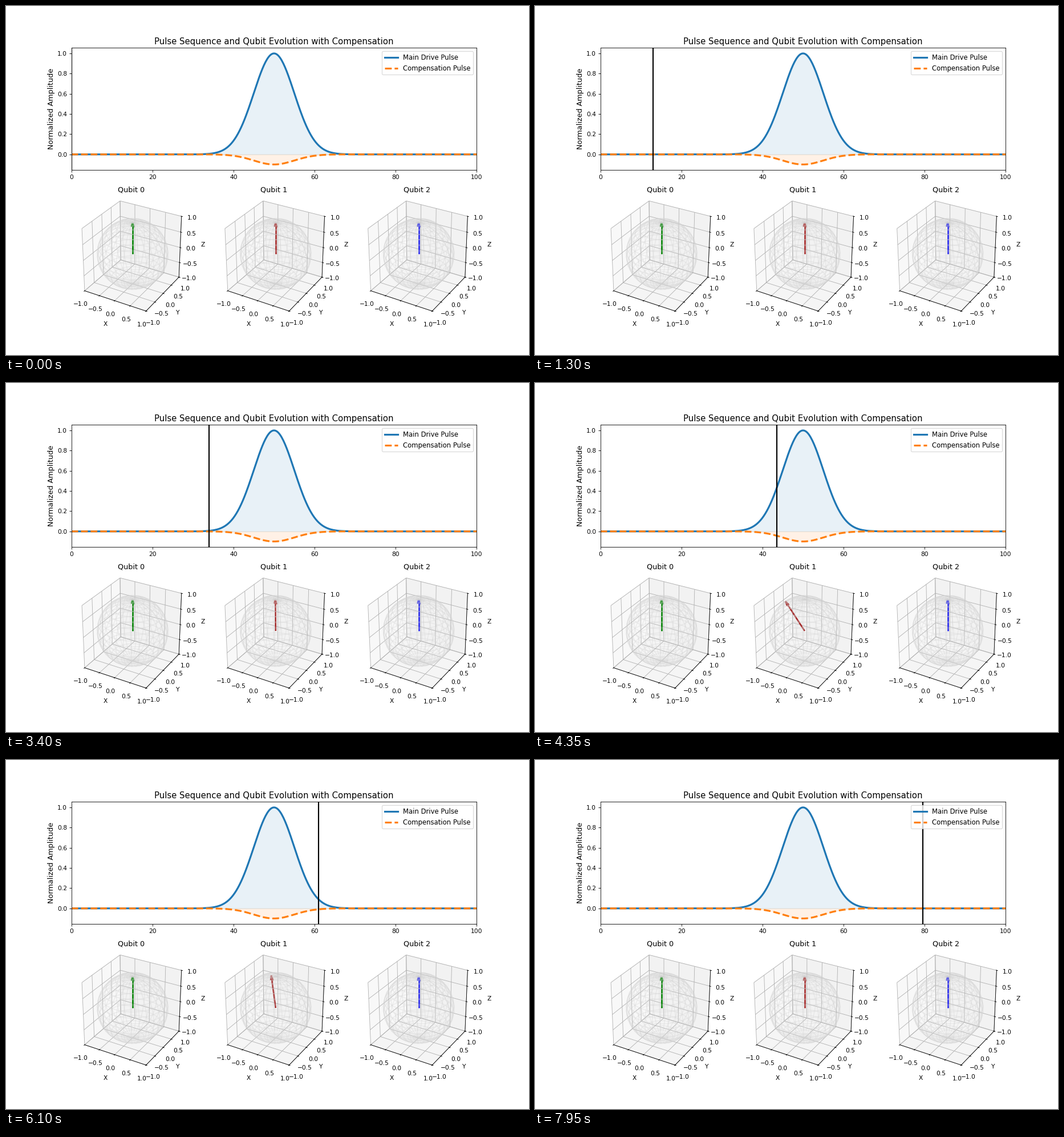
Recreate the animation shown at these times as a matplotlib script. Size 917x611 px, loop 8 s.

```python
import numpy as np
import matplotlib.pyplot as plt
from matplotlib.animation import FuncAnimation

W, H, DPI = 917, 611, 76.4
FRAMES, INTERVAL = 160, 50
STEP = 0.5          # time units per frame
CENTER, SIGMA = 50, 5


def pulse(t):
    return np.exp(-((t - CENTER) ** 2) / (2 * SIGMA ** 2))


def bloch_vector(t):
    theta = np.pi / 2 * pulse(t)
    return -np.sin(theta), 0, np.cos(theta)


def draw_arrow(ax, vec, color):
    return ax.quiver(0, 0, 0, *vec, color=color, linewidth=2.5,
                     arrow_length_ratio=0.15)


def draw_sphere(ax):
    u = np.linspace(0, 2 * np.pi, 30)
    v = np.linspace(0, np.pi, 20)
    x = np.outer(np.cos(u), np.sin(v))
    y = np.outer(np.sin(u), np.sin(v))
    z = np.outer(np.ones_like(u), np.cos(v))
    ax.plot_wireframe(x, y, z, color="lightgray", alpha=0.3)


fig = plt.figure(figsize=(W / DPI, H / DPI), dpi=DPI)
grid = fig.add_gridspec(2, 3)

# Pulse plot
top = fig.add_subplot(grid[0, :])
t = np.linspace(0, 100, 500)
main, comp = pulse(t), -0.1 * pulse(t)
top.plot(t, main, color="tab:blue", lw=3, label="Main Drive Pulse")
top.plot(t, comp, color="tab:orange", lw=3, ls="--",
         label="Compensation Pulse")
top.fill_between(t, main, color="tab:blue", alpha=0.1)
top.fill_between(t, comp, color="tab:orange", alpha=0.1)
cursor = top.axvline(0, color="black", lw=2)
top.set_xlim(0, 100)
top.set_title("Pulse Sequence and Qubit Evolution with Compensation",
              fontsize=14)
top.set_ylabel("Normalized Amplitude", fontsize=12)
top.legend(loc="upper right", fontsize=11)

# Bloch spheres
COLORS = ["green", "brown", "#2626eb"]
spheres, arrows = [], []
for i, color in enumerate(COLORS):
    ax = fig.add_subplot(grid[1, i], projection="3d")
    draw_sphere(ax)
    ax.set(xlim=(-1, 1), ylim=(-1, 1), zlim=(-1, 1),
           xlabel="X", ylabel="Y", zlabel="Z", title=f"Qubit {i}")
    ax.set_box_aspect([1, 1, 1])
    ticks = np.linspace(-1, 1, 5)
    ax.set(xticks=ticks, yticks=ticks, zticks=ticks)
    spheres.append(ax)
    arrows.append(draw_arrow(ax, (0, 0, 1), color))


def update(frame):
    now = frame * STEP
    cursor.set_xdata([now, now])
    arrows[1].remove()
    arrows[1] = draw_arrow(spheres[1], bloch_vector(now), COLORS[1])
    return cursor, arrows[1]


anim = FuncAnimation(fig, update, frames=FRAMES, interval=INTERVAL,
                     repeat=True, repeat_delay=0, blit=False)
plt.show()
```
